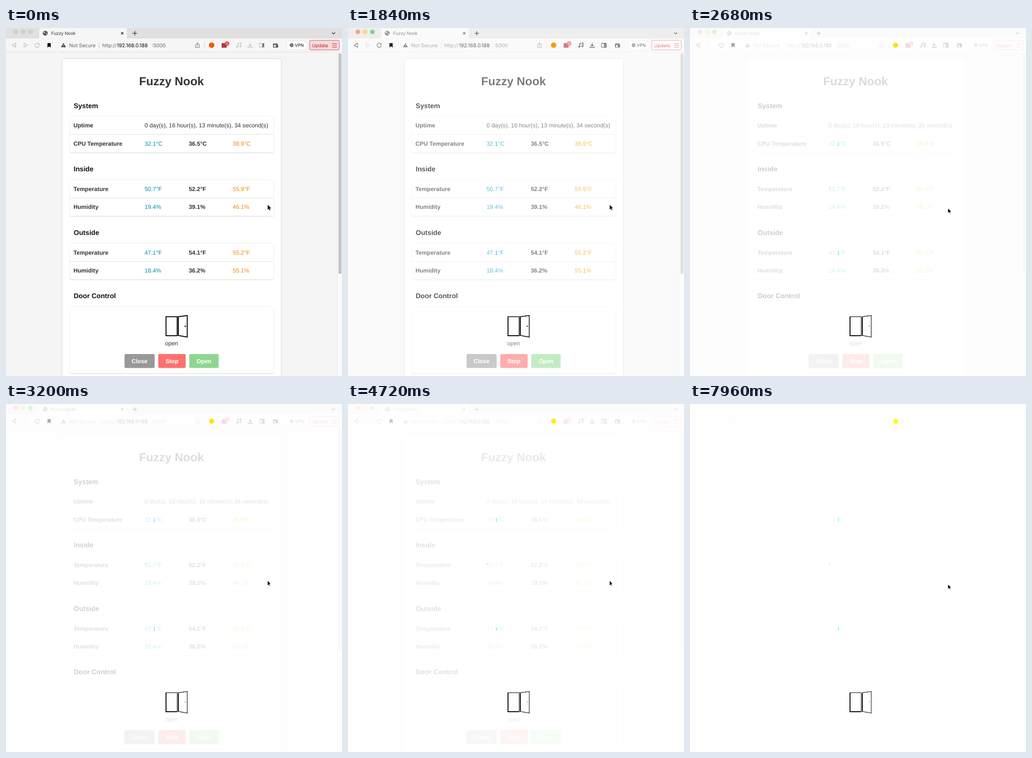
An HTML page that plays this animation: 737x760 px, repeating every 8 s.

```html
<!DOCTYPE html>
<html lang="en">
<head>
<meta charset="utf-8">
<title>Fuzzy Nook</title>
<style>
  html, body { margin: 0; width: 100%; height: 100%; overflow: hidden; background: #fff; }
  svg { display: block; width: 737px; height: 760px; }
  text { font: 12.8px "Liberation Sans", Arial, sans-serif; fill: #333; text-rendering: geometricPrecision; }
  .chrome text { font: 11px Inter, Roboto, sans-serif; fill: #333; }
  .chrome .title { font: 10.1px "Liberation Sans", Arial, sans-serif; }
  .chrome .dim { fill: #666; }
  .chrome .host { fill: #0a0a0a; }
  .chrome .vpn { font-size: 9.4px; fill: #080808; }
  .chrome .update { font-size: 10.3px; fill: #c02030; }
  .chrome .badge { font-size: 7px; fill: #fff; }
  .bold, .row text:nth-of-type(3) { font-weight: bold; }
  .heading { font-size: 15px; font-weight: bold; fill: #111; }
  .main { font-size: 25.6px; font-weight: bold; text-anchor: middle; }
  .low { fill: #008fb0; }
  .high { fill: #f08800; }
  .button { font-weight: bold; fill: #fff; text-anchor: middle; }
  .panel { fill: #fff; filter: drop-shadow(0 1px 1px rgba(0, 0, 0, .18)); }
  .card { fill: #fff; filter: drop-shadow(0 0 2px rgba(0, 0, 0, .16)); }
  .icon { fill: none; stroke: #0a0a0a; stroke-width: 1.1; }
  .pale { stroke: #bbb; }
  .mid { stroke: #777; }
  .door { fill: none; stroke: #000; stroke-width: 2; }
  .tabs { fill: #dedcdd; }
  .light { stroke: #0001; }
  .update-box { fill: #fffafa; stroke: #d55058; }
  .blurred .tabs { fill: #e2dfe0; }
  .blurred .light { fill: #d2cfd0; }
  .blurred .focusable { stroke: #b4b4b4; }
  .blurred .update-box { fill: #f3dcdd; }
</style>
</head>
<body>
<svg viewBox="0 0 737 760">
  <defs>
    <filter id="wash" filterUnits="userSpaceOnUse" x="0" y="0" width="737" height="760" color-interpolation-filters="sRGB">
      <feComponentTransfer>
        <feFuncR type="gamma" exponent="1"/>
        <feFuncG type="gamma" exponent="1"/>
        <feFuncB type="gamma" exponent="1"/>
      </feComponentTransfer>
    </filter>
  </defs>
  <g id="stage" class="blurred" filter="url(#wash)">
    <rect width="737" height="760" fill="#f5f5f5"/>

    <g id="page">
      <rect class="card" x="124" y="68" width="479" height="720" rx="4"/>
      <text class="main" x="363" y="125">Fuzzy Nook</text>
    </g>

    <rect class="panel" x="140" y="609" width="447" height="145" rx="3"/>
    <path d="M144 608.5H582" stroke="#eee"/>
    <text class="heading" x="148.5" y="590">Door Control</text>
    <g class="door">
      <path d="M351 630.5H375.5V672H351ZM378 630.5L397.5 628V675L378 671.5Z"/>
      <circle cx="393.3" cy="651.3" r=".6"/>
    </g>
    <text x="363" y="692.5" text-anchor="middle">open</text>
    <g id="buttons"></g>

    <g class="chrome">
      <rect class="tabs" width="737" height="23"/>
      <path d="M73 23V4Q73 0 77 0H261Q265 0 265 4V23Z" fill="#f7f6f6"/>
      <rect y="23" width="737" height="29" fill="#f7f6f6"/>
      <path d="M0 52.5H737" stroke="#dedede"/>
      <circle class="light" cx="21.5" cy="8.5" r="5" fill="#fb5a53"/>
      <circle class="light" cx="37.5" cy="8.5" r="5" fill="#f9b82c"/>
      <circle class="light" cx="53.5" cy="8.5" r="5" fill="#28b93c"/>
      <circle cx="86" cy="11.3" r="5.4" fill="#4c4f52"/>
      <path d="M82 9L85 7.5L86 10L83.5 12ZM87 12L90 11L88 15Z" fill="#ddd"/>
      <text class="title" x="99" y="15">Fuzzy Nook</text>
      <path class="icon" d="M252.500 9L257.500 14M257.500 9L252.500 14M277.500 11.500H287.500M282.500 6.500V16.500"/>
      <path class="icon" d="M715 10L718.500 13L722 10"/>

      <path class="icon focusable" d="M21 33V42L13.500 37.500Z"/>
      <path class="icon pale" d="M39.500 33V42L46.500 37.500Z"/>
      <path class="icon focusable" d="M72 34.500A4.700 4.700 0 1 0 73 39M73 33V36.300H69.500"/>
      <path d="M91 33H98V43L94.500 40L91 43Z" fill="#040404"/>
      <path d="M126 32.500L131.300 42H120.700Z" fill="#444"/>
      <path d="M126 36V39M126 40V41" stroke="#fff"/>
      <text class="dim" x="138.500" y="41.500">Not Secure</text>
      <path d="M204.500 31V45" stroke="#c8c8c8"/>
      <text class="dim" x="211" y="41.500">http://</text>
      <text class="host" x="243" y="41.500">192.168.0.188</text>
      <text class="dim" x="320" y="41.500">:5000</text>
      <path class="icon mid" d="M418 36H416V42.500H424V36H422M420 40V32.500M418 34.500L420 32.500L422 34.500"/>
      <path d="M435.500 31V45" stroke="#d0d0d0"/>
      <circle cx="451" cy="37.500" r="6" fill="#f45a00"/>
      <rect x="473" y="33" width="11" height="10" fill="#b8304c"/>
      <circle cx="485" cy="34" r="5" fill="#e8503c"/>
      <text class="badge" x="485" y="36.600" text-anchor="middle">5</text>
      <g class="icon focusable">
        <path d="M508.500 41V34L515.500 32.500V39.500"/>
        <circle cx="507" cy="41" r="1.500"/><circle cx="514" cy="40" r="1.500"/>
        <path d="M535.500 33V39.500M533 37L535.500 39.500L538 37M531 39V42.500H540V39"/>
        <rect x="556" y="33.500" width="10" height="8.500"/>
        <path d="M562 33.500H566V42H562Z" fill="#666"/>
      </g>
      <path class="icon" d="M586.500 34.500H594.500V36.500M586.500 34.500V42H596V36.500H587M592.500 38.500H596V40.500H592.500Z"/>
      <rect x="614.500" y="28" width="47" height="19.500" rx="9.700" fill="#fff" stroke="#e2e2e4"/>
      <circle cx="626.500" cy="37.500" r="4" fill="#5c6070"/>
      <path d="M624.500 37.500H628.500" stroke="#fff"/>
      <text class="vpn" x="633.500" y="41">VPN</text>
      <rect class="update-box" x="666" y="27" width="65" height="21" rx="3"/>
      <text class="update" x="671.500" y="41.500">Update</text>
      <path d="M715.500 34H726M715.500 38H726M715.500 42H726" stroke="#c02030" stroke-width="1.200"/>
    </g>

    <rect x="727" y="53" width="10" height="707" fill="#fafafa"/>
    <path d="M726.500 53V760" stroke="#e8e8e8"/>
    <rect x="729.300" y="55" width="6.400" height="482" rx="3.200" fill="#c1c1c1"/>
    <path id="cursor" d="M0 0V10.700L2.500 8.400L4.200 12.200L6 11.400L4.300 7.700H7.600Z" fill="#000" stroke="#fff" stroke-width=".8" paint-order="stroke"/>
  </g>
</svg>
<script>
const LOOP = 8000, HOLD = 480, STEP = 40, FLICKER_FROM = 1320;
const byId = id => document.getElementById(id);
const stage = byId('stage'), page = byId('page'), cursor = byId('cursor');
const channels = document.querySelectorAll('feComponentTransfer > *');

const uptime = s => `0 day(s), 16 hour(s), 13 minute(s), ${s} second(s)`;
const label = (x, y, text, cls = '', id = '') =>
  `<text x="${x}" y="${y}" class="${cls}" id="${id}">${text}</text>`;

const readings = (name, y, low, now, high, id) => `<g class="row">` +
  label(148, y, name, 'bold') + label(304, y, low, 'low') +
  label(401, y, now, 'bold', id) + label(497.3, y, high, 'high') + '</g>';

const section = (name, top, first, second) =>
  `<text class="heading" x="148.5" y="${top - 18.5}">${name}</text>
   <rect class="panel" x="140" y="${top}" width="447" height="78.5" rx="3"/>
   <path d="M144 ${top - .5}H582" stroke="#eee"/>
   <path d="M140 ${top + 39.5}H587" stroke="#dedede"/>` + first(top + 24.3) + second(top + 63.7);

page.innerHTML +=
  section('System', 193,
    y => label(148, y, 'Uptime', 'bold') + label(304, y, uptime(34), '', 'uptime'),
    y => readings('CPU Temperature', y, '32.1°C', '36.5°C', '38.9°C', 'cpu')) +
  section('Inside', 331.7,
    y => readings('Temperature', y, '50.7°F', '52.2°F', '55.9°F', 'insideTemp'),
    y => readings('Humidity', y, '19.4%', '39.1%', '46.1%', 'insideHumidity')) +
  section('Outside', 470.5,
    y => readings('Temperature', y, '47.1°F', '54.1°F', '55.2°F', 'outsideTemp'),
    y => readings('Humidity', y, '18.4%', '36.2%', '55.1%', 'outsideHumidity'));

byId('buttons').innerHTML = [
  ['Close', 260, 66, '#999'], ['Stop', 334, 60, '#ff6f6f'], ['Open', 402, 64.5, '#90d690']
].map(([text, x, w, fill]) =>
  `<rect x="${x}" y="712" width="${w}" height="30.5" rx="3.2" fill="${fill}"/>` +
  label(x + w / 2, 731.5, text, 'button')).join('');

// Gamma exponent over time: bright colours wash out while pure black stays.
const washKeys = [[480, 1], [1240, .56], [1840, .46], [2680, .1], [3760, .085], [4640, .08], [5480, .002]];

function washAt(t) {
  const i = washKeys.findIndex(([time]) => time >= t);
  if (i === 0) return 1;
  if (i < 0) return washKeys.at(-1)[1];
  const [t0, a] = washKeys[i - 1], [t1, b] = washKeys[i];
  return a * (b / a) ** ((t - t0) / (t1 - t0));
}

function draw(time) {
  const t = Math.floor(time % LOOP / STEP) * STEP;
  const later = t >= FLICKER_FROM && (t - HOLD) / STEP % 2 === 1;
  stage.classList.toggle('blurred', t < HOLD);
  cursor.setAttribute('transform', later ? 'translate(566 393.5)' : 'translate(574 386)');
  byId('uptime').textContent = uptime(later ? 35 : 34);
  byId('insideHumidity').textContent = later ? '39.2%' : '39.1%';
  byId('outsideHumidity').textContent = later ? '36.3%' : '36.2%';
  const exponent = washAt(t);
  channels.forEach(c => c.setAttribute('exponent', exponent));
}

const start = performance.now();
(function tick() {
  draw(performance.now() - start);
  requestAnimationFrame(tick);
})();
</script>
</body>
</html>
```
